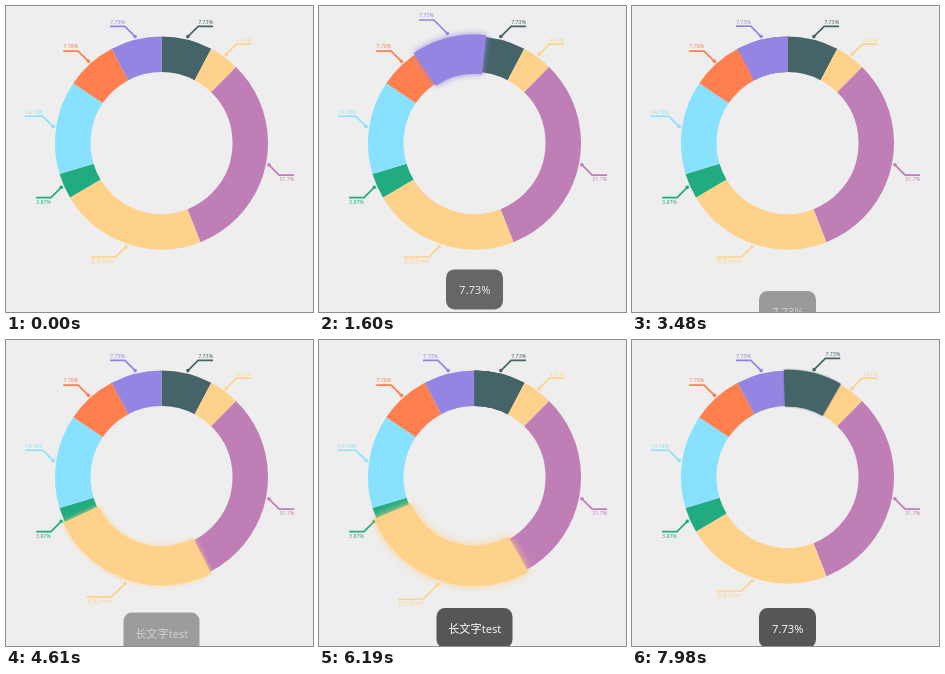
Write an HTML page with a canvas that moves like this. It is 307 px wide and 306 px high and loops after 8000 ms.

```html
<!DOCTYPE html>
<html lang="en">
<head>
<meta charset="utf-8">
<title>Ring chart</title>
<style>
  html, body { margin: 0; width: 100%; height: 100%; overflow: hidden; background: #eee; }
  canvas { display: block; width: 307px; height: 306px; }
</style>
</head>
<body>
<canvas></canvas>
<script>
const W = 307, H = 306, LOOP = 8000;
const CX = 155.5, CY = 137, RADIUS = 88.8, THICK = 35.5;
const RISE = 500, FALL = 800;
const FONT = '"Open Sans", "Noto Sans CJK SC", "Noto Sans CJK", "Noto Sans", sans-serif';
const LONG = '长文字test';

// up / down: when a slice is selected and released
const slices = [
  { share: 7.73, color: '#446467', text: '7.73%', up: 6190, down: 7570 },
  { share: 4.61, color: '#ffd28c', text: '4.61%' },
  { share: 31.7, color: '#c07eb7', text: '31.7%' },
  { share: 22.4, color: '#ffd28c', text: LONG, up: 4380, down: 6190 },
  { share: 3.87, color: '#20ab80', text: '3.87%' },
  { share: 14.18, color: '#87e1ff', text: '14.18%' },
  { share: 7.78, color: '#ff7f4f', text: '7.78%' },
  { share: 7.73, color: '#9485e2', text: '7.73%', up: 1350, down: 2780 }
];

const toasts = [
  { text: '7.73%', width: 57, from: 1400, out: 3320, to: 3560 },
  { text: LONG, width: 76, from: 4515, out: 6230, to: 6480 },
  { text: '7.73%', width: 57, from: 6490, out: 9000, to: 9300 }
];

const total = slices.reduce((sum, s) => sum + s.share, 0);
let angle = -Math.PI / 2;
for (const s of slices) {
  s.start = angle;
  angle += s.share / total * Math.PI * 2;
  s.end = angle;
}

const canvas = document.querySelector('canvas');
const ctx = canvas.getContext('2d');
const dpr = window.devicePixelRatio || 1;
canvas.width = Math.round(W * dpr);
canvas.height = Math.round(H * dpr);

const clamp = x => Math.max(0, Math.min(1, x));
const decelerate = x => 1 - (1 - clamp(x)) ** 2;

function backOut(x) {
  const u = clamp(x) - 1;
  return 1 + 2.85 * u ** 3 + 1.85 * u ** 2;
}

function lift(s, t) {
  if (s.up === undefined || t < s.up) return 0;
  return t < s.down ? decelerate((t - s.up) / RISE) : 1 - decelerate((t - s.down) / FALL);
}

function drawSlice(s, p) {
  const spread = p * 8.2 * Math.PI / 180;
  ctx.save();
  if (p > 0) {
    ctx.shadowColor = s.color;
    ctx.shadowBlur = 8 * p * dpr;
  }
  ctx.strokeStyle = s.color;
  ctx.lineWidth = THICK + 5 * p;
  ctx.beginPath();
  ctx.arc(CX, CY, RADIUS, s.start - spread, s.end + spread);
  ctx.stroke();
  ctx.restore();
}

function drawLabel(s, p) {
  const mid = (s.start + s.end) / 2;
  const dx = Math.cos(mid) < 0 ? -1 : 1;
  const dy = Math.sin(mid) < 0 ? -1 : 1;
  const r = 109.6 + 4.3 * p;
  const x = CX + r * Math.cos(mid), y = CY + r * Math.sin(mid);
  const reach = 10.3 + 4.2 * p;
  const ex = x + dx * reach, ey = y + dy * reach;

  ctx.font = '5.3px ' + FONT;
  const width = ctx.measureText(s.text).width;
  ctx.fillStyle = ctx.strokeStyle = s.color;
  ctx.lineWidth = 1.7;
  ctx.beginPath();
  ctx.moveTo(x, y);
  ctx.lineTo(ex, ey);
  ctx.lineTo(ex + dx * width, ey);
  ctx.stroke();
  ctx.beginPath();
  ctx.arc(x, y, 1.8, 0, Math.PI * 2);
  ctx.fill();

  ctx.textAlign = 'left';
  ctx.textBaseline = 'alphabetic';
  ctx.fillText(s.text, dx < 0 ? ex - width : ex, ey + (dy < 0 ? -2.6 : 6.2));
}

function drawToast(o, t) {
  if (t < o.from || t >= o.to) return;
  const age = t - o.from;
  const leave = clamp((t - o.out) / (o.to - o.out)) ** 2;
  const y = 268 + 40 * (1 - backOut(age / 350)) + 38 * leave;
  ctx.save();
  ctx.globalAlpha = decelerate(age / 300) * (1 - leave);
  ctx.fillStyle = '#565656';
  ctx.beginPath();
  ctx.roundRect(CX - o.width / 2, y, o.width, 40, 8.5);
  ctx.fill();
  ctx.fillStyle = '#fff';
  ctx.font = '11.2px ' + FONT;
  ctx.textAlign = 'center';
  ctx.textBaseline = 'alphabetic';
  ctx.fillText(o.text, CX + 0.2, y + 25);
  ctx.restore();
}

function draw(t) {
  ctx.setTransform(dpr, 0, 0, dpr, 0, 0);
  ctx.fillStyle = '#eee';
  ctx.fillRect(0, 0, W, H);

  const active = [];
  for (const s of slices) {
    drawSlice(s, 0);
    const p = lift(s, t);
    if (p > 0) active.push([s, p]);
  }
  for (const s of slices) if (!lift(s, t)) drawLabel(s, 0);
  for (const [s, p] of active) {
    drawSlice(s, p);
    drawLabel(s, p);
  }
  for (const o of toasts) drawToast(o, t);
}

const began = performance.now();
function tick() {
  draw((performance.now() - began) % LOOP);
  requestAnimationFrame(tick);
}
tick();
</script>
</body>
</html>
```
